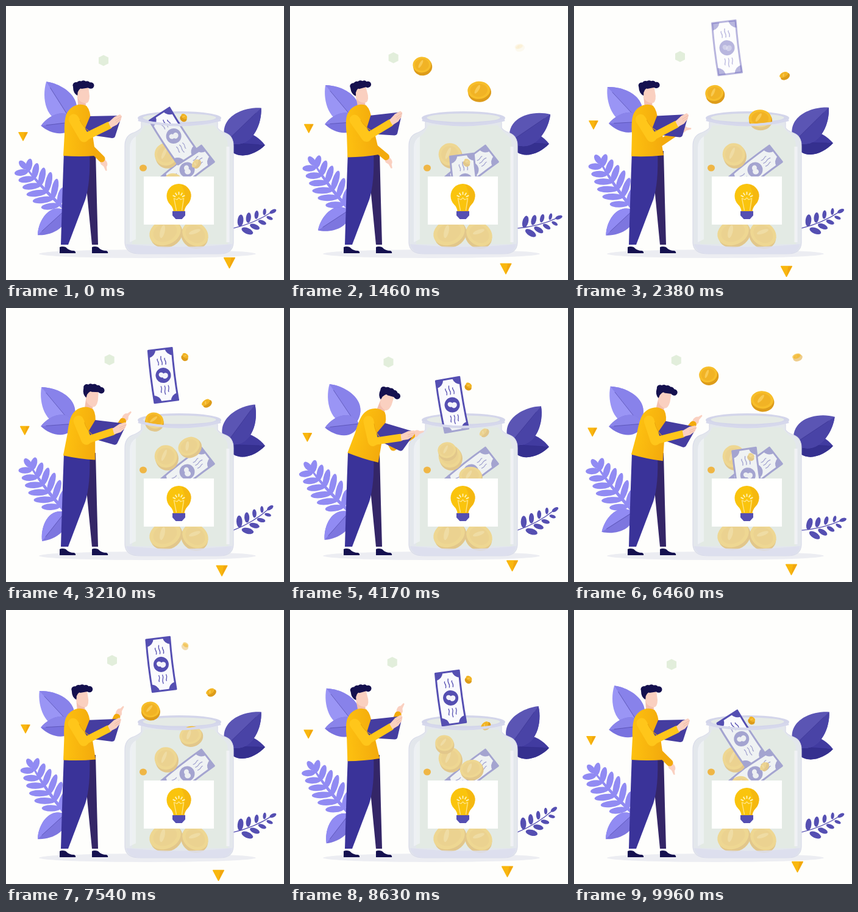
Animation, 456 px wide and 450 px high, one loop 10 s. Source, as an HTML page with a canvas:

```html
<!DOCTYPE html>
<html lang="en">
<head>
<meta charset="utf-8">
<title>Savings jar</title>
<style>
html, body { margin: 0; width: 100%; height: 100%; overflow: hidden; background: #fefefc; }
canvas { display: block; width: 456px; height: 450px; }
</style>
</head>
<body>
<canvas id="stage"></canvas>
<script>
const LOOP = 10000;
const SECOND_DROP = 4750;
const SECOND_SWING = 5210;
const SWING = 4670;
const FALL = .0505; // pixels per ms

const PAPER = '#fefefc', SKIN = '#fad0c0', INK = '#15114f';
const SHIRT = '#fdc010', SHADE = '#f3aa0c', SLEEVE = '#ffc61a';
const PLUM = '#554fb2', LILAC = '#918bf3';

const canvas = document.getElementById('stage');
const ctx = canvas.getContext('2d');
const ratio = window.devicePixelRatio || 1;
canvas.width = 456 * ratio;
canvas.height = 450 * ratio;

const rad = deg => deg * Math.PI / 180;
const clamp01 = v => Math.min(1, Math.max(0, v));
const ease = (from, to, t) => {
  const s = clamp01((t - from) / (to - from));
  return s * s * (3 - 2 * s);
};

function at(x, y, deg, draw) {
  ctx.save();
  ctx.translate(x, y);
  ctx.rotate(rad(deg));
  draw();
  ctx.restore();
}
function shape(path, fill, stroke, width = 1) {
  const p = new Path2D(path);
  if (fill) { ctx.fillStyle = fill; ctx.fill(p); }
  if (stroke) { ctx.strokeStyle = stroke; ctx.lineWidth = width; ctx.stroke(p); }
}
function oval(x, y, rx, ry, fill, deg = 0) {
  ctx.fillStyle = fill;
  ctx.beginPath();
  ctx.ellipse(x, y, rx, ry, rad(deg), 0, 7);
  ctx.fill();
}

// Leaf growing from its base; the angle is clockwise from straight up.
function leaf(x, y, len, width, deg, left, right) {
  at(x, y, deg, () => {
    const half = side => `M0 0C${side * width * .85} ${-len * .2} ${side * width * .5} ${-len * .75} 0 ${-len}Z`;
    shape(half(-1) + half(1), left);
    shape(half(1), right);
    shape(`M0 0V${-len * .85}`, null, 'rgba(45,38,130,.45)', .9);
  });
}

function feather(turn) {
  at(97, 335, turn - 43, () => {
    shape('M-2 0Q-7 -55 0 -100H2Q-1 -55 3 0Z', LILAC);
    for (let i = 0; i < 6; i++) {
      const reach = 33 - 3.6 * Math.abs(i - 1.5);
      for (const side of [-1, 1]) {
        oval(side * reach * .42 - 2, -14 - i * 15 - reach * .25, 5.3, reach * .55, LILAC, side * 55);
      }
    }
    oval(0, -101, 5, 9, LILAC);
  });
}

function twig(deg) {
  at(372, 364, -deg, () => {
    shape('M-2 1Q35 7 70 0', null, PLUM, 1.3);
    for (let i = 0; i < 4; i++) {
      const x = 14 + i * 14, r = 10 - i * 1.5;
      oval(x + 2, -6 + i * .5, r, r * .48, PLUM, -62);
      oval(x + 6, 14 - i * 2, r, r * .48, PLUM, 45);
    }
    oval(71, 0, 6, 3, PLUM, -5);
  });
}

function triangle(x, y, w) {
  ctx.lineJoin = 'round';
  shape(`M${x - w} ${y - w * .9}H${x + w}L${x} ${y + w}Z`, '#f9b70e', '#f9b70e', 1.5);
  shape(`M${x + w * .35} ${y - w * .9}H${x + w}L${x} ${y + w}Z`, '#f1a511');
}

function coin(x, y, rx, ry, deg) {
  at(x, y, deg, () => {
    oval(.5, 2, rx, ry, '#dd9c1a');
    oval(-.5, -1.5, rx - .5, ry - 1.5, '#f7be2a');
    oval(-.5, -1.5, rx * .74, ry * .68, '#f1b325');
    oval(-rx * .15, -ry * .2, rx * .14, ry * .5, '#f9ca52', 35);
  });
}

function bill(x, y, deg, w = 39) {
  at(x, y, deg, () => {
    const h = 43, a = w / 2;
    shape(`M${-a} ${-h}H${a}Q${a - 2} 0 ${a} ${h}H${-a}Q${-a - 2} 0 ${-a} ${-h}Z`, '#fafafd', PLUM, 3);
    for (const sx of [-1, 1]) for (const sy of [-1, 1]) {
      const flip = new DOMMatrix([sx, 0, 0, sy, 0, 0]);
      const corner = new Path2D();
      corner.addPath(new Path2D(`M${a} ${h}h-12q2 -10 12 -12z`), flip);
      ctx.fillStyle = PLUM;
      ctx.fill(corner);
    }
    oval(0, 0, 12.5, 12.5, PLUM);
    oval(-3, -1, 4.5, 4, '#f4f3fb', 45);
    oval(3, 1, 5, 4.5, '#f4f3fb', -45);
    for (const sy of [-1, 1]) for (const x of [-6, 0, 6]) {
      shape(`M${x} ${sy * 17}q1.5 ${sy * 4} 0 ${sy * 7}t0 ${sy * (x ? 4 : 8)}`, null, PLUM, 1.3);
    }
  });
}

// All loose items of one drop, by the time since it started.
function drop(age) {
  if (age < 0) return;
  const item = (born, top, draw) => {
    if (age < born) return;
    ctx.globalAlpha = clamp01((age - born) / 560);
    draw(top + (age - born) * FALL);
    ctx.globalAlpha = 1;
  };
  const wobble = Math.sin(age / 420);
  const tip = Math.exp(-(((age - 5230) / 720) ** 2));
  item(2150, 57, y => bill(231 + age * .0084, y, -7 - 26 * tip));
  item(830, 66, y => coin(195 + age * .0151, y, 15.5, 14.5, 18 * wobble));
  item(0, 66, y => coin(318 - age * .0052, y, 19, 16, -10 - 18 * wobble));
  item(1430, 66, y => coin(305 + 61 * Math.exp((1710 - age) / 1600), y, 8, 5.5, -age / 90));
  item(2600, 49, y => coin(297 - age * .001, y, 6, 5, 35));
}

const GLASS = 'M222 187V200Q218 205 207 209Q195 214 195 230V389Q196 407 220 407H350Q372 407 373 389V230Q373 214 361 209Q350 205 347 200V187Q284 201 222 187Z';

function jarBack() {
  shape(GLASS, '#e0e2ee');
  shape('M227 196H341Q348 206 358 214Q364 219 364 231V391H207V231Q207 219 214 214Q222 208 227 196Z', '#dfe8de');
  oval(284.5, 184, 68.5, 11, '#d3d5ea');
  oval(284.5, 183.5, 60, 7, '#e5eae6');
}

function jarFront() {
  shape(GLASS, 'rgba(232,237,234,.54)', '#d9dbea', 1.2);
  shape('M197 391Q200 406 220 407H350Q369 406 371 391Q285 400 197 391Z', 'rgba(220,222,239,.85)');
  shape('M203 233Q203 220 213 214V383L203 388Z', 'rgba(246,247,251,.6)');
  shape('M364 231V388', null, 'rgba(248,248,252,.65)', 5);
  shape('M217 187Q284 204 352 187', null, '#d6d8ec', 4);
  ctx.fillStyle = '#fffffe';
  ctx.fillRect(226, 280, 115, 79);
}

function bulb() {
  at(283.5, 312, 0, () => {
    oval(0, 0, 20, 20, '#fac40d');
    shape('M-17 10Q-9 19 -9 25H9Q9 19 17 10Z', '#fac40d');
    shape('M4 -19Q27 -10 17 10Q9 19 9 25H3Q16 2 4 -19Z', '#f5b810');
    shape('M-4 24L-8 4l5 2 3 -3 3 3 5 -2L5 24', null, '#ffe48a', 1.3);
    for (let i = -2; i <= 2; i++) at(0, 4, i * 32, () => shape('M0 -6V-11', null, '#fff2b8', 1.8));
    shape('M-10.5 25H10.5V32L5 38H-5L-10.5 32Z', PLUM);
  });
}

function jar(t) {
  jarBack();
  bill(297, 269, 52, 34);
  coin(263, 245, 19, 20, -12);
  ctx.save();
  ctx.beginPath();
  ctx.rect(0, 0, 456, 330);
  ctx.clip();
  for (const start of [SECOND_DROP - LOOP, 0, SECOND_DROP]) drop(t - start);
  ctx.restore();
  coin(262, 373, 27, 22, -22);
  coin(310, 376, 23, 20, 35);
  jarFront();
  bulb();
  oval(225, 266, 6, 5.5, '#efb645');
}

function limb(path, width, color) {
  ctx.lineCap = ctx.lineJoin = 'round';
  shape(path, null, color, width);
  ctx.lineCap = 'butt';
}

// Two bones of equal length from shoulder to wrist.
function backArm(t) {
  const raised = ease(1560, 3000, t) - ease(8650, 9650, t);
  const reach = ease(3500, 4900, t) - ease(5300, 6400, t);
  const sx = 137, sy = 190, bone = 36;
  const wx = 157 + 26 * raised + 6 * reach;
  const wy = 251 - 74 * raised + 22 * reach;
  const dx = wx - sx, dy = wy - sy, dist = Math.hypot(dx, dy);
  const bend = Math.sqrt(bone * bone - dist * dist / 4) / dist;
  const ex = (sx + wx) / 2 - dy * bend, ey = (sy + wy) / 2 + dx * bend;
  at(wx, wy, 148 - 126 * raised + 42 * reach, () => {
    shape('M-3.5 3L-4.5 -8Q-4 -14 0 -15L3 -21L5 -20L4 -12L6 -7L3.5 3Z', SKIN);
  });
  limb(`M${sx} ${sy}L${ex} ${ey}L${wx} ${wy}`, 11, SHADE);
}

function head() {
  shape('M117 145L118 163Q124 169 131 163L130 153Z', '#f3bfae');
  shape('M117 133L135 132L137 148Q137 160 130 160Q117 157 117 145Z', SKIN);
  for (let i = 0; i < 5; i++) {
    oval(115 + i * 6, 132 - 4.5 * Math.sin(.4 + i * .6), 5.5, 5.2, INK);
  }
  shape('M110 133Q110 143 117 147L119 139Q122 134 124 136L137 134L140 129L116 127Z', INK);
  oval(120, 143, 2.4, 3.2, SKIN);
}

function man(t) {
  const w = t / LOOP * 2 * Math.PI;
  const lean = 4.8 - 11.7 * Math.cos(w) + 5.4 * Math.cos(2 * w) + 1.5 * Math.cos(3 * w);
  shape('M117 238H147L149 320L151 392H141L133 309Z', '#342667');
  shape('M95 238H137Q139 290 130 318L102 392H90Q92 320 95 238Z', '#3a3399');
  for (const x of [88, 141]) {
    at(x, 406, 0, () => shape('M0 0V-10Q4 -12 10 -10Q15 -4 24 -4Q27 -2 26 0Z', INK));
  }
  at(121, 243, lean, () => {
    ctx.translate(-121, -243);
    backArm(t);
    at(124, 165, lean * .4, () => { ctx.translate(-124, -165); head(); });
    const cloth = ctx.createLinearGradient(96, 0, 146, 0);
    cloth.addColorStop(0, SHIRT);
    cloth.addColorStop(1, SHADE);
    shape('M115 163Q123 160 132 164Q139 172 139 190L147 246Q120 248 94 246L96 210Q95 183 101 174Q106 166 115 163Z', cloth);
    shape('M138 181L187 180Q190 180 189 183L179 214Q178 217 174 217L133 211Q126 209 128 205Z', '#453da0');
    limb('M111 186L128 215', 17, SLEEVE);
    limb('M128 216L169 196', 12, SLEEVE);
    shape('M168 191L178 182L187 178L190 181L188 188L182 195L172 200Z', SKIN);
    shape('M179 188L189 182M180 191L188 186', null, '#eab5a3', .8);
    shape('M121 187Q126 199 137 206', null, '#e9a30c');
  });
}

function plants(drift, sway) {
  feather(8.3 * drift);
  leaf(97, 335, 61, 32, -132.5 + 10 * sway, '#7d76df', LILAC);
  leaf(108, 190, 78, 46, -32.5 - 10.5 * drift, '#9a95f5', '#8882ea');
  leaf(113, 190, 56, 32, -97 + 4 * drift, '#7972df', '#8a84ea');
  leaf(361, 224, 64, 38, 94 - 3 * drift, '#413ba0', '#35308f');
  leaf(361, 223, 80, 46, 46 + 10.5 * sway, '#5b55b4', '#4943a6');
  twig(22 - 9 * sway);
}

function render(t) {
  ctx.setTransform(ratio, 0, 0, ratio, 0, 0);
  ctx.fillStyle = PAPER;
  ctx.fillRect(0, 0, 456, 450);

  // Each swing ends in a short rest.
  const swing = clamp01((t < SECOND_SWING ? t : t - SECOND_SWING) / SWING) * 2 * Math.PI;
  const drift = (1 - Math.cos(swing)) / 2, sway = Math.sin(swing);

  oval(232, 407, 178, 7, '#ecedf2');
  at(160 + 14 * drift, 89.5 - 6.5 * drift, 0, () => shape('M0 -9L8 -5V5L0 9L-8 5V-5Z', '#e2eedb'));
  triangle(28 + 4 * drift, 214 - 19 * drift, 7);
  triangle(366.5 - 18 * drift, 421.5 + 14 * drift, 8.8);
  plants(drift, sway);
  jar(t);
  man(t);
}

const start = performance.now();
function frame() {
  render((performance.now() - start) % LOOP);
  requestAnimationFrame(frame);
}
frame();
</script>
</body>
</html>
```
